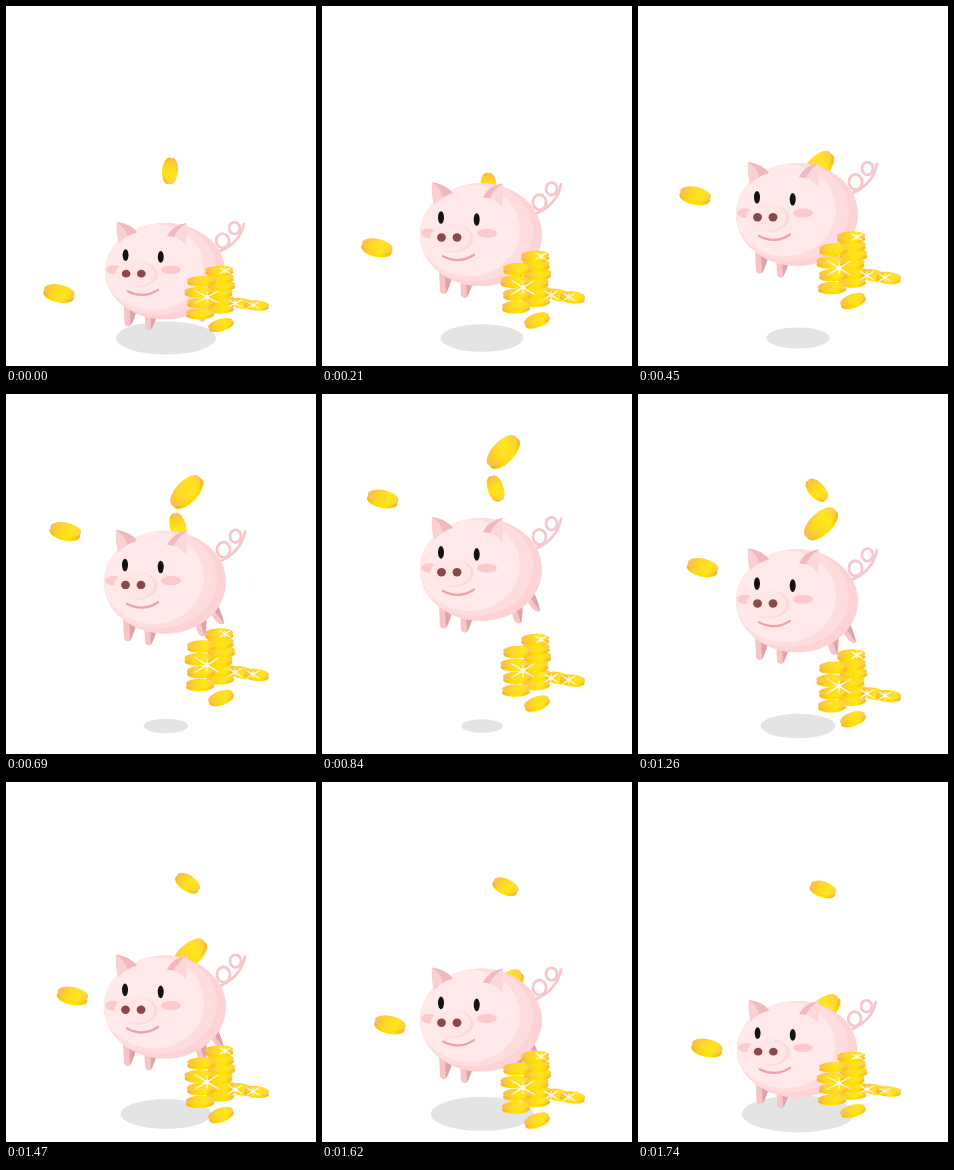
Write an HTML page with a canvas that moves like this. It is 310 by 360 pixels and loops after 1.77 s.

```html
<!DOCTYPE html>
<html lang="en">
<head>
<meta charset="utf-8">
<title>Piggy bank</title>
<style>
html, body { margin: 0; width: 100%; height: 100%; overflow: hidden; background: #fff; }
canvas { display: block; }
</style>
</head>
<body>
<canvas id="stage" width="310" height="360"></canvas>
<script>
const ctx = document.getElementById('stage').getContext('2d');
const LOOP = 1770, STEP = 30, LAND = 1740, TOP = LAND / 2;

// Moves evenly from a to b until the turning time, then on to c at landing.
const swing = (t, a, b, c, turn = TOP) =>
  t < turn ? a + (b - a) * t / turn : b + (c - b) * (t - turn) / (LAND - turn);

function ellipse(x, y, rx, ry, fill, turn = 0) {
  ctx.beginPath();
  ctx.ellipse(x, y, rx, ry, turn, 0, Math.PI * 2);
  ctx.fillStyle = fill;
  ctx.fill();
}

function shape(d, fill) {
  ctx.fillStyle = fill;
  ctx.fill(new Path2D(d));
}

function line(d, color, width) {
  ctx.strokeStyle = color;
  ctx.lineWidth = width;
  ctx.lineCap = 'round';
  ctx.stroke(new Path2D(d));
}

function blend(r, ...colors) {
  const g = ctx.createLinearGradient(-r, -r / 4, r, r / 4);
  colors.forEach((c, i) => g.addColorStop(i / (colors.length - 1), c));
  return g;
}

function coin(x, y, rx, ry, degrees, depth) {
  ctx.save();
  ctx.translate(x, y);
  ctx.rotate(degrees * Math.PI / 180);
  ellipse(0, depth / 2, rx, ry, blend(rx, '#f4ab30', '#ffd900', '#ffe500', '#f5b52a'));
  ellipse(0, -depth / 2, rx, ry, blend(rx, '#fcbd55', '#fdcd3c', '#ffe52a', '#fcc552'));
  ellipse(0, -depth / 2, rx * 0.8, ry * 0.76, blend(rx, '#fbb83e', '#ffd924', '#ffe51c', '#fdca40'));
  ctx.restore();
}

function sparkle(x, y, r) {
  for (const turn of [-0.55, 0.55]) ellipse(x, y, r, 0.75, '#fffdf0', turn);
  ellipse(x, y, 0.6, r * 0.5, '#fffdf0');
  ellipse(x, y, r * 0.15, r * 0.15, '#fff');
}

function leg(x, y, slant) {
  ctx.save();
  ctx.translate(x, y);
  ctx.transform(1, 0, slant, 1, 0, 0);
  shape('M-7 -13L7 -9Q4 3 0 10Q-4 12 -6 8Z', '#f6c5c8');
  shape('M-1 -10L7 -9Q4 3 0 10Z', '#dfa4a8');
  ctx.restore();
}

function pig(top, crouch) {
  ctx.save();
  ctx.translate(159, top);
  ctx.scale(1 - 0.015 * crouch, 1 - 0.065 * crouch);
  ctx.translate(-159, -137);

  line('M239 138Q235 158 215 167', '#f6c8cb', 2.8);
  line('M211 155A6.5 7.5 0 1 1 224 157A6.5 7.5 0 1 1 211 155', '#f6c8cb', 2.8);
  line('M224 142A5.3 6 0 1 1 235 143A5.3 6 0 1 1 224 142', '#f6c8cb', 2.8);

  leg(124, 237, 0);
  leg(145, 241, 0);
  leg(196, 232, 0.3);
  leg(211, 220, 0.7);

  ctx.save();
  ctx.beginPath();
  ctx.ellipse(159, 188.5, 61, 51.5, 0, 0, Math.PI * 2);
  ctx.clip();
  ctx.fillStyle = '#fdd3d5';
  ctx.fillRect(90, 130, 140, 120);
  ellipse(151, 185, 60, 50, '#ffdddf');
  ellipse(147, 184, 51, 46, '#ffe9ea');
  ctx.restore();

  shape('M110 136Q124 138 131 147Q120 150 112 159Q109 148 110 136Z', '#fbd0d3');
  shape('M110 136Q124 138 131 147Q126 148 121 151Q119 142 110 136Z', '#efb9bd');
  shape('M161 151Q167 139 181 137Q182 149 180 161Q173 151 161 151Z', '#fdd7d9');
  shape('M161 151Q167 139 181 137Q171 144 168 152Z', '#efb9bd');

  ellipse(107, 187, 8, 4.7, '#fccacd');
  ellipse(165, 187, 10, 4.6, '#fccacd');
  ellipse(131, 192, 20.5, 14, '#fdd9db');
  ellipse(128.5, 191.5, 20, 13.5, '#ffe7e7');
  for (const x of [119.5, 135]) ellipse(x, 191.2, 4.4, 4.2, '#8b484b');
  ellipse(119, 171.3, 3, 6.3, '#151213');
  ellipse(154.7, 173.3, 3, 6.3, '#151213');
  line('M121 210Q137 218.5 152 208.5', '#eba5a9', 2.3);
  ctx.restore();
}

function stack(x, y, count, gap) {
  for (let i = 0; i < count; i++)
    coin(x + 1.5 * Math.sin(i * 2.4), y - i * gap, 14, 4.6, -2, 3.4);
}

function pile(ground, crouch) {
  const s = 1 - 0.15 * crouch;
  ctx.save();
  ctx.translate(0, ground);
  ctx.scale(1, s);
  stack(214, -19.5, 6, 8.8);
  stack(194, -13, 4, 12.8);
  coin(236, -25.5, 12, 4.6, 10, 3);
  coin(250.5, -23, 12.5, 4.6, 6, 3);
  coin(215, 0, 13, 5.6, -20, 3);
  sparkle(219, -64, 7);
  sparkle(201, -33, 15);
  sparkle(229, -25.5, 9);
  sparkle(247, -23.5, 8);
  ctx.restore();
}

function draw(t) {
  const crouch = Math.min(1, Math.max(0, 1 - Math.min(t, LAND - t) / 120));
  ctx.fillStyle = '#fff';
  ctx.fillRect(0, 0, 310, 360);

  const shadow = swing(t, 50, 18.4, 56, 780);
  ellipse(160, 332, shadow, shadow * 0.33, '#e4e4e4');

  coin(53 + t * 0.0092, swing(t, 287.5, 98.5, 266), 15.6, 7, 12, 4);

  // The small coin dips behind the pig, pops out, then hangs in the air.
  const smallY = t < TOP ? swing(t * 2, 165, 196, 87) : swing(t, 0, 87, 107.5);
  coin(swing(t, 164, 174, 185), smallY, 13.3, 6.4, swing(t, 95, 70, 18), 3.2);
  coin(178 + t * 0.004, swing(t, 282, 50, 228), 19.8, 9.2, swing(t, -48, -46, -40), 4);

  pig(swing(t, 195, 121.5, 197) + 22 * crouch, crouch);
  pile(swing(t, 333, 294.5, 343, 435) - 14 * crouch, crouch);
}

function frame() {
  draw(Math.floor(performance.now() % LOOP / STEP) * STEP);
  requestAnimationFrame(frame);
}
frame();
</script>
</body>
</html>
```
